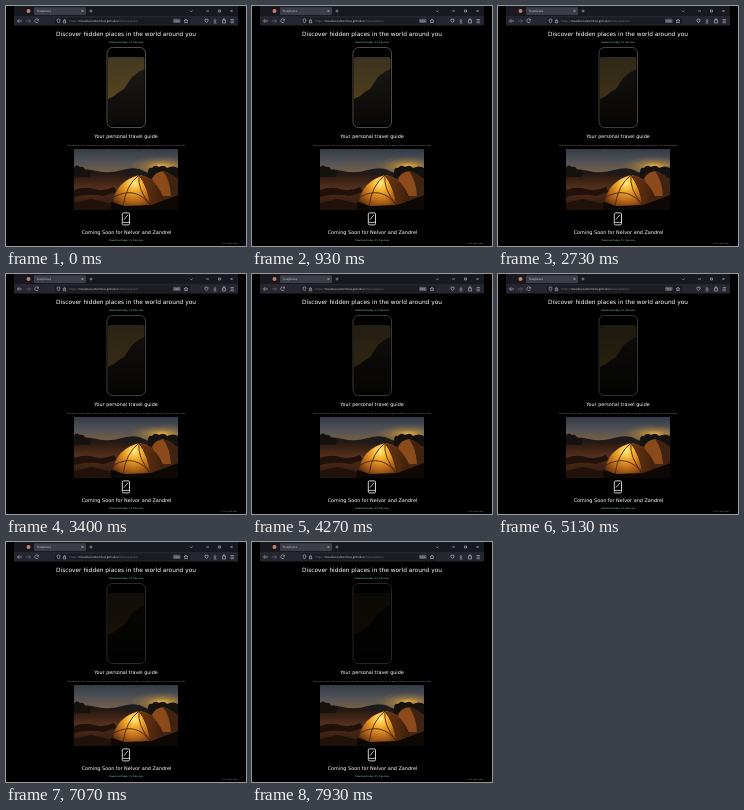
Write an HTML page that moves like this. It is 240x240 px and loops after 8000 ms.

```html
<!DOCTYPE html>
<html lang="en">
<head>
<meta charset="utf-8">
<title>Travel guide</title>
<style>
  html, body { margin: 0; width: 100%; height: 100%; overflow: hidden; background: #000; }
  svg { display: block; width: 100%; height: 100%; }
  text { text-rendering: geometricPrecision; }
  .page { font-family: "DejaVu Sans", sans-serif; text-anchor: middle; fill: #fff; }
  .page .link { font-size: 2.25px; fill: #86e4d6; }
  .page .note { font-size: 1.95px; fill: #8c8680; }
  .ui { font: 2.9px "Open Sans", sans-serif; fill: #d2d2da; }
  .ui .dim { fill: #777783; }
  .icons { fill: none; stroke: #a9a9b5; stroke-width: .7; }
</style>
</head>
<body>
<svg viewBox="0 0 240 240">
  <defs>
    <linearGradient id="dusk" x2="0" y2="1">
      <stop offset="0" stop-color="#423823"/>
      <stop offset=".6" stop-color="#57431f"/>
    </linearGradient>
    <linearGradient id="cliff" x2="0" y2="1">
      <stop offset="0" stop-color="#1b1915"/>
      <stop offset="1" stop-color="#0a0908"/>
    </linearGradient>
    <linearGradient id="sky" x2="0" y2="1">
      <stop offset="0" stop-color="#343b46"/>
      <stop offset=".5" stop-color="#505257"/>
      <stop offset="1" stop-color="#7c6142"/>
    </linearGradient>
    <radialGradient id="sun">
      <stop offset="0" stop-color="#f2b53c"/>
      <stop offset=".4" stop-color="#b98a3a" stop-opacity=".6"/>
      <stop offset="1" stop-color="#80663a" stop-opacity="0"/>
    </radialGradient>
    <linearGradient id="sand" x2="0" y2="1">
      <stop offset="0" stop-color="#251710"/>
      <stop offset=".4" stop-color="#54301c"/>
      <stop offset="1" stop-color="#2a150c"/>
    </linearGradient>
    <radialGradient id="glow" gradientUnits="userSpaceOnUse" cx="128" cy="177" r="30">
      <stop offset="0" stop-color="#fff08a"/>
      <stop offset=".25" stop-color="#f5b12e"/>
      <stop offset=".6" stop-color="#b9681a"/>
      <stop offset="1" stop-color="#45200a"/>
    </radialGradient>
    <linearGradient id="shade">
      <stop offset="0" stop-color="#6d3810"/>
      <stop offset="1" stop-color="#3c1d0c"/>
    </linearGradient>
    <clipPath id="photoBox"><path d="M68 143h104v61H68z"/></clipPath>
    <clipPath id="screenBox"><rect x="102" y="51" width="36.5" height="68" rx="2"/></clipPath>
  </defs>

  <rect width="240" height="240"/>

  <!-- browser window -->
  <path fill="#181820" d="M8 0h224v10H8z"/>
  <path fill="#262630" d="M8 10h224v9.5H8z"/>
  <rect x="28" y="1.3" width="52" height="7.8" rx="1.2" fill="#3d3d47"/>
  <rect x="49" y="11.4" width="135" height="7" rx="1.2" fill="#1b1b23"/>
  <rect x="167" y="12.8" width="7.5" height="4.2" rx="1" fill="#555560"/>
  <circle cx="22.5" cy="5" r="2" fill="#c4806c"/>
  <g class="ui">
    <text x="30.5" y="6.3">Tourplaces</text>
    <text x="63" y="16"><tspan class="dim">https://</tspan>meadow-lanternbox.github.io<tspan class="dim">/travel-places/</tspan></text>
    <text x="168.2" y="15.9" font-size="2.6">50%</text>
  </g>
  <g class="icons">
    <path d="M75.5 4l2 2m0-2l-2 2M83.5 5h3M85 3.5v3M184 4.5l1.3 1.3 1.3-1.3M200 5h3M212.5 4h2v2h-2zM224.5 4l2 2m0-2l-2 2"/>
    <path d="M16 15h-4.5m1.8-1.8L11.5 15l1.8 1.8M32.2 13.6a1.9 1.9 0 1 0 .2 2M32.4 12.8v1.4H31"/>
    <path stroke="#696976" d="M20 15h4.5m-1.8-1.8l1.8 1.8-1.8 1.8"/>
    <path d="M51 13.4l1.5-.5 1.5.5q0 2.6-1.5 3.7Q51 16 51 13.4zM57.3 14.8h2.4v2h-2.4zm.5 0v-1q.7-1 1.4 0v1"/>
    <path d="M180 13l.6 1.4 1.4.1-1.1 1 .4 1.5-1.3-.8-1.3.8.4-1.5-1.1-1 1.4-.1z"/>
    <path d="M199 13.2h3v2q-1.5 2.5-3 0zM209 12.8v3m-1.2-1.2l1.2 1.2 1.2-1.2m-2.6 2.4h2.8M216.5 14h3v3h-3zm.8 0v-1.2h1.4V14M224.5 13.5h3.4m-3.4 1.6h3.4m-3.4 1.6h3.4"/>
  </g>

  <!-- page text -->
  <g class="page">
    <text x="120" y="29.5" font-size="5.86">Discover hidden places in the world around you</text>
    <text class="link" x="120" y="37">Download today, it's free now</text>
    <text x="120" y="132" font-size="4.85">Your personal travel guide</text>
    <text class="note" x="120" y="139.8">Find quiet corners, share your routes and save every place you would like to see again, wherever your next journey leads</text>
    <text x="120.5" y="228" font-size="4.93">Coming Soon for Nelvor and Zandrel</text>
    <text class="link" x="120" y="235.2">Download today, it's free now</text>
    <text class="note" x="223" y="238">© All rights kept</text>
  </g>

  <!-- phone -->
  <g id="screen" clip-path="url(#screenBox)">
    <path fill="url(#dusk)" d="M102 51h37v68h-37z"/>
    <path fill="url(#cliff)" d="M139 63l-5 2-4 3-4 3-4 6-4 6-5 3-5 4-6 3v26h37z"/>
  </g>
  <rect id="phone" x="101" y="41.5" width="38.5" height="80" rx="5.5" fill="none" stroke="#6a655a" stroke-width=".8"/>

  <!-- camp photo -->
  <g clip-path="url(#photoBox)">
    <path fill="url(#sky)" d="M68 143h104v25H68z"/>
    <ellipse cx="156" cy="160" rx="34" ry="10" fill="url(#sun)"/>
    <path fill="#1c1a1a" d="M68 164q12-2 23 1t25-1 22 1 34-2v9H68z"/>
    <path fill="url(#sand)" d="M68 169q28-3 60 0t44-1v36H68z"/>
    <path fill="#14110f" d="M68 161q3-3 6 0 4-1 5 3 4-1 6 3l-2 4H68zM142 167q0-6 4-5 3-4 7-1 5-3 8 1 6-3 11 0v10h-30z"/>
    <path fill="#20120b" d="M68 184q11-4 20-1t20-2l3 5-13 4q-15-3-30 1zM68 197l17-4 22 5 5 6H68z"/>
    <path fill="#8a4a19" d="M146 173q3-7 11-8 10 3 15 10v15h-17z"/>
    <path fill="#3f2210" d="M157 165q7 9 8 25h7v-15q-5-7-15-10z"/>
    <path fill="url(#glow)" d="M107 195q4-20 26-26 18 3 25 25l-13 6-27 1z"/>
    <path fill="url(#shade)" d="M133 169q9 12 12 31l13-6q-7-22-25-25z"/>
    <path fill="none" stroke="#4a250c" stroke-width=".9" d="M133 169q-13 10-16 31M133 169q9 12 12 31M133 169q-2 14 12 31M108 191q22-12 37 9"/>
    <path fill="#0e0805" d="M105 196l13 4 27-1 14-5 13-5v15h-67z"/>
  </g>

  <!-- device icon -->
  <g fill="none" stroke="#e6e6e6" stroke-width=".9">
    <rect x="116.3" y="206.9" width="7.2" height="12" rx="1.2"/>
    <path stroke-width=".8" d="M116.5 216.4h7M118 213.6l4-4.8"/>
  </g>
</svg>
<script>
  const fade = (id, steps) => document.getElementById(id).animate(steps, {
    duration: 8000, iterations: Infinity, easing: "steps(120)"
  });
  fade("screen", { opacity: [1, 0.16] });
  fade("phone", { stroke: ["#6a655a", "#303030"] });
</script>
</body>
</html>
```
